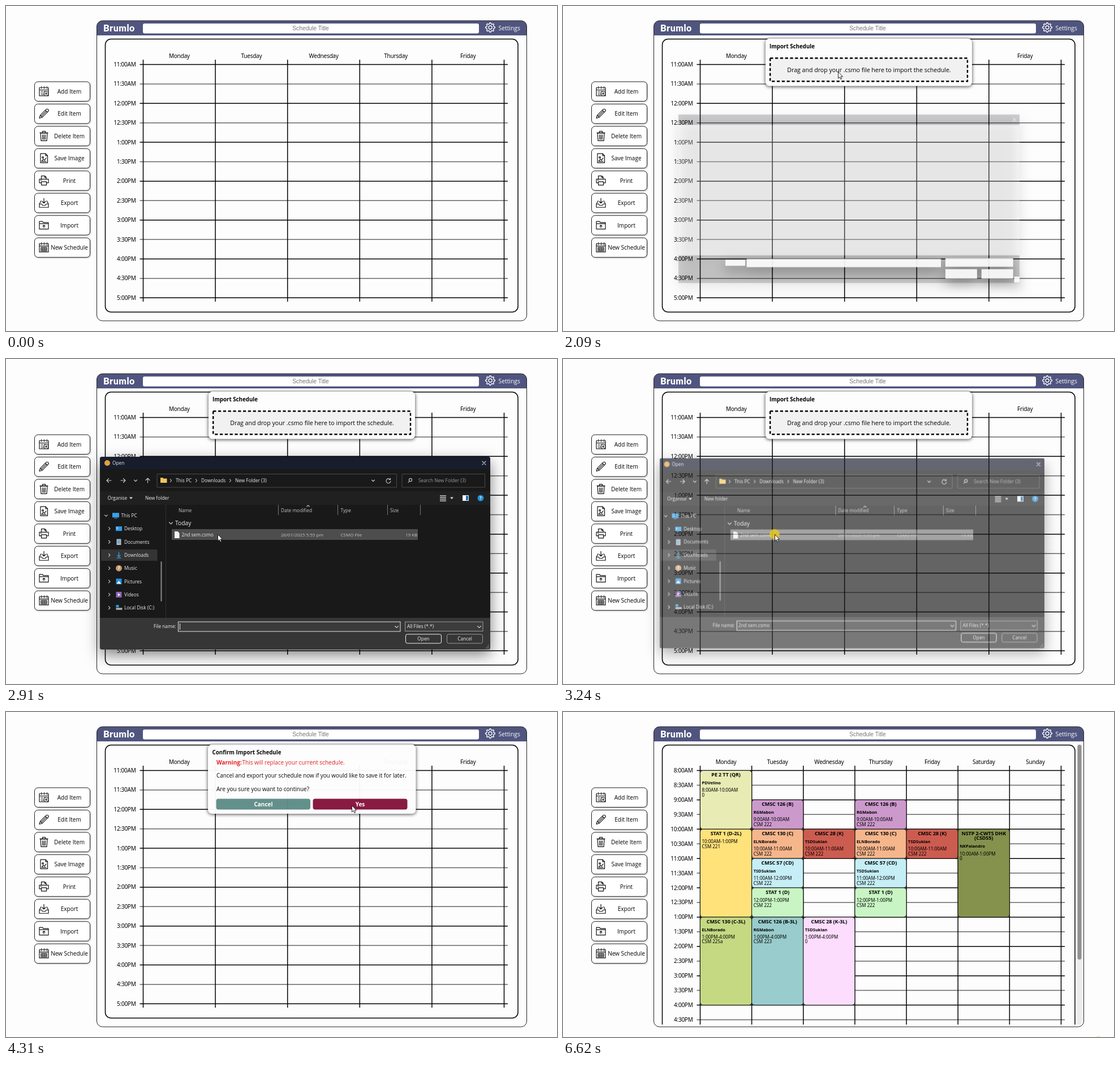
Write an HTML page that moves like this. It is 974 px wide and 575 px high and loops after 6.75 s.

```html
<!DOCTYPE html>
<html lang="en">
<head>
<meta charset="utf-8">
<title>Schedule import</title>
<style>
html, body { margin: 0; width: 100%; height: 100%; overflow: hidden; background: #fdfdfd; }
#stage { display: block; width: 974px; height: 575px; }
text { font-family: "Open Sans", "Noto Sans", sans-serif; font-size: 10px; white-space: pre; }
.b { font-weight: 700; }
.m { text-anchor: middle; }
.e { text-anchor: end; }
.logo { font: 900 16px Lato, sans-serif; letter-spacing: .5px; fill: #fff; }
.field { font: 10.3px "Liberation Sans", Arial, sans-serif; fill: #777; }
.cal text { font-family: "Noto Sans", sans-serif; letter-spacing: -.25px; }
.cal .title { font-size: 9px; font-weight: 700; letter-spacing: -.1px; }
.cal .who { font-size: 7.5px; font-weight: 700; letter-spacing: 0; }
.cal .info { font-size: 8px; letter-spacing: 0; }
.line { fill: none; stroke: #000; stroke-width: 1.5; }
.half { fill: none; stroke: #666; stroke-width: 1.5; }
.icon { fill: none; stroke: #111; stroke-width: 1.2; stroke-linejoin: round; stroke-linecap: round; }
.btn { fill: #fff; stroke: #222; filter: drop-shadow(1px 1px 1px rgba(0,0,0,.25)); }
.pop { fill: #fdfdfd; filter: drop-shadow(0 1px 3px rgba(0,0,0,.75)); }
.dlg text { font-size: 8.3px; fill: #ededed; }
.dlg .dim { fill: #9a9a9a; }
.dlg .soft { fill: #c4c4c4; }
.thin { fill: none; stroke: #c8c8c8; stroke-width: 1.1; stroke-linecap: round; stroke-linejoin: round; }
.rule { fill: none; stroke: #4a4a4a; }

/* One loop is 6750 ms, so 1% is 67.5 ms. */
.old, .week, .blank, .pulse, .row, .pick, .type, .hover, .drop, .dlg, .import, .confirm, .cursor {
  animation: 6750ms linear infinite;
}
.old, .week, .blank, .pulse, .row, .pick, .type { animation-timing-function: step-end; }
.dlg, .blank { transform-origin: 511px 343.5px; filter: drop-shadow(0 9px 13px rgba(0,0,0,.5)); }
.blank { transform: translate(-5.5px, -2.5px) scale(.874); }

.old { animation-name: old; }
.week { animation-name: week; }
.blank { animation-name: blank; }
.pulse { animation-name: pulse; }
.row { animation-name: row; }
.pick { animation-name: pick; }
.type { animation-name: type; }
.hover { animation-name: hover; }
.drop { animation-name: drop; }
.dlg { animation-name: dlg; }
.import { animation-name: import; }
.confirm { animation-name: confirm; }
.cursor { animation-name: cursor; }

@keyframes old { 0% { opacity: 1 } 64.7%, 100% { opacity: 0 } }
@keyframes week { 0% { opacity: 0 } 64.7%, 100% { opacity: 1 } }
@keyframes blank { 0% { opacity: 0 } 30.9% { opacity: 1 } 31.9%, 100% { opacity: 0 } }
@keyframes pulse {
  0% { opacity: 0 } 11.4% { opacity: 1 } 13.4% { opacity: 0 }
  27.9% { opacity: 1 } 29.6% { opacity: 0 }
  44% { opacity: 1 } 45.1% { opacity: 0 }
  46.9% { opacity: 1 } 48.8% { opacity: 0 }
  62.7% { opacity: 1 } 63.8% { opacity: 0 }
  98%, 100% { opacity: 1 }
}
@keyframes row { 0% { fill: #191919 } 40% { fill: #4d4d4d } 44.1%, 100% { fill: #777 } }
@keyframes pick { 0% { opacity: 0 } 44.1%, 100% { opacity: 1 } }
@keyframes type { 0% { opacity: 1 } 44.1%, 100% { opacity: 0 } }
@keyframes hover { 0%, 8.6% { fill: #fff } 10%, 15% { fill: #e9e9e9 } 16.6%, 100% { fill: #fff } }
@keyframes drop { 0%, 21.5% { fill: #fdfdfd } 23.5%, 100% { fill: #f1f1f1 } }
@keyframes dlg {
  0%, 31.9% { opacity: 0; transform: scale(.95) }
  32% { opacity: .8; transform: scale(.97) }
  33%, 46.963% { opacity: 1; transform: none }
  48% { opacity: .68; transform: scale(.987) }
  48.9%, 100% { opacity: 0; transform: scale(.95) }
}
@keyframes import {
  0%, 12.4% { opacity: 0 } 15.5%, 48.1% { opacity: 1 } 49.5%, 100% { opacity: 0 }
}
@keyframes confirm {
  0%, 48.9% { opacity: 0 } 49.926% { opacity: .88 } 51%, 63.8% { opacity: 1 } 65.7%, 100% { opacity: 0 }
}
@keyframes cursor {
  0% { transform: translate(926px, 590px) }
  1.037% { transform: translate(925px, 568px); animation-timing-function: ease-in-out }
  10.37%, 15.5% { transform: translate(112px, 388px); animation-timing-function: ease-in-out }
  26%, 35% { transform: translate(486px, 116px); animation-timing-function: ease-in-out }
  41.04%, 55% { transform: translate(374px, 310px); animation-timing-function: ease-in-out }
  61.8%, 75.7% { transform: translate(611px, 165px) }
  76.741% { transform: translate(615.3px, 169px); animation-timing-function: ease-in-out }
  86.074% { transform: translate(935px, 552px); animation-timing-function: ease-out }
  90.222%, 100% { transform: translate(946.5px, 583px) }
}
</style>
</head>
<body>
<svg id="stage" viewBox="0 0 974 575">
  <rect x="160.5" y="26" width="760" height="531" rx="10" fill="#fdfdfd"/>
  <path d="M160.5 52V36a10 10 0 0 1 10-10h740a10 10 0 0 1 10 10v16z" fill="#50557f"/>
  <text class="logo" x="172" y="45">Brumlo</text>
  <rect x="242" y="31" width="594" height="17.5" rx="3" fill="#fff"/>
  <text class="field m" x="538.5" y="43.2">Schedule Title</text>
  <g id="gear" fill="none" stroke="#fff" stroke-width="1.3"></g>
  <text x="870.5" y="43.3" fill="#fff" style="font-size:10.4px">Settings</text>

  <g class="cal old" id="days5"></g>
  <svg width="974" height="553"><g class="cal week" id="days7"></g></svg>
  <rect x="160.5" y="26" width="760" height="531" rx="10" fill="none" stroke="#222"/>
  <g id="buttons"></g>

  <g class="import">
    <rect class="pop" x="358" y="57.5" width="365" height="84" rx="7"/>
    <text class="b" x="365" y="74.5" style="font-size:9.75px">Import Schedule</text>
    <rect class="drop" x="366.2" y="92.2" width="348.8" height="41" stroke="#000" stroke-width="2.4" stroke-dasharray="5.2 3.6"/>
    <text class="m" x="541" y="116.6" style="font-size:10.6px">Drag and drop your .csmo file here to import the schedule.</text>
  </g>

  <g class="blank">
    <rect x="166" y="173" width="690" height="21" fill="rgba(20,22,30,.2)"/>
    <rect x="166" y="194" width="690" height="264" fill="rgba(255,255,255,.24)"/>
    <rect x="166" y="458" width="690" height="56" fill="rgba(20,20,20,.18)"/>
    <path d="M261 467h40v12h-40zM304 465h393v17H304zM706 464h137v17H706zM706 486h64v19h-64zM779 486h64v19h-64zM845 501h11v12h-11z" fill="rgba(255,255,255,.9)"/>
    <path d="M842 180l7 7m0-7l-7 7" stroke="#fff"/>
  </g>

  <g class="dlg">
    <rect x="166" y="173" width="690" height="341" rx="4" fill="#191919"/>
    <path d="M166 195v-18a4 4 0 0 1 4-4h682a4 4 0 0 1 4 4v18z" fill="#181d2c"/>
    <circle cx="179" cy="184" r="5" fill="#e3a13c"/>
    <text x="188" y="187.2">Open</text>
    <path class="thin" d="M842 181l6 6m0-6l-6 6"/>
    <path class="thin" d="M186 215h-8m3.5-3.5l-3.5 3.5 3.5 3.5M203 215h8m-3.5-3.5l3.5 3.5-3.5 3.5M226.500 214l2.500 2.500 2.500-2.500M250.500 219v-8m-3.500 3.500l3.500-3.500 3.500 3.500M646.500 214l2.500 2.500 2.500-2.500M679 213a4 4 0 1 0 1 3m-.5-5v2.500h-2.500"/>
    <path class="rule" d="M267 203.500h423.500v23.500H267zM700 203.500h146.500v23.500H700z"/>
    <path d="M273 210h4l1.500 1.500h6V219H273z" fill="#f1c65f"/>
    <path class="thin" d="M290.500 212.500l2 2.500-2 2.500M335.500 212.500l2 2.500-2 2.500M395.500 212.500l2 2.500-2 2.500"/>
    <text x="300" y="218">This PC</text>
    <text x="345" y="218">Downloads</text>
    <text x="405" y="218">New Folder (3)</text>
    <g class="thin" stroke="#888"><circle cx="715" cy="214" r="2.600"/><path d="M713 216l-2 2.500"/></g>
    <text class="dim" x="729" y="218">Search New Folder (3)</text>
    <rect x="166" y="234" width="690" height="24" fill="#202020"/>
    <text x="179.500" y="249">Organise</text>
    <path d="M218 244.500h6l-3 3.500zM785 244.500h6l-3 3.500z" fill="#ddd"/>
    <text x="246" y="249">New folder</text>
    <path d="M767 242h11m-11 3h11m-11 3h11m-11 3h11" stroke="#ccc" stroke-width="1.500"/>
    <rect x="807.500" y="241.500" width="10" height="9" fill="#1d6fb8" stroke="#eee"/>
    <path d="M808 242h5v8h-5z" fill="#fff"/>
    <circle cx="839" cy="246" r="5.500" fill="#1e90dc"/>
    <text class="m b" x="839" y="249">?</text>
    <path class="rule" d="M282.500 258v200" stroke-opacity=".5"/>
    <path class="rule" d="M481.500 258v18M586.500 258v18M674.500 258v18M732.500 258v18" style="stroke:#777"/>
    <path class="thin" d="M531.500 261l2.500-2 2.500 2"/>
    <text class="soft" x="305" y="270.500">Name</text>
    <text class="soft" x="486" y="270.500">Date modified</text>
    <text class="soft" x="591.500" y="270.500">Type</text>
    <text class="soft" x="679" y="270.500">Size</text>
    <rect x="168" y="337" width="99.500" height="20" fill="#343434"/>
    <g id="tree"></g>
    <path d="M274.500 359v69" stroke="#8a8a8a" stroke-width="2" stroke-linecap="round"/>
    <path class="thin" d="M288.500 289l3 3 3-3"/>
    <text x="299" y="293.700" style="font-size:10.300px">Today</text>
    <rect class="row" x="293" y="301" width="435" height="19"/>
    <path d="M298 305h5.500l3 3v9H298z" fill="#f4f4f4"/>
    <text x="310.500" y="314">2nd sem.csmo</text>
    <text class="soft" x="486" y="314" style="font-size:8px">26/01/2025 5:55 pm</text>
    <text class="soft" x="591.500" y="314" style="font-size:8px">CSMO File</text>
    <text class="soft e" x="727.500" y="314" style="font-size:8px">19 KB</text>
    <path d="M166 458h690v52a4 4 0 0 1-4 4H170a4 4 0 0 1-4-4z" fill="#363636"/>
    <text class="e" x="300.500" y="476">File name:</text>
    <rect x="304.500" y="465" width="392.500" height="17" fill="#3a3a3a" stroke="#e6e6e6"/>
    <path class="type" d="M307.500 468v11" stroke="#eee"/>
    <text class="pick" x="307" y="476.300">2nd sem.csmo</text>
    <rect x="705.500" y="465" width="137.500" height="16.500" fill="#3c3c3c" stroke="#999"/>
    <text x="709" y="476">All Files (*.*)</text>
    <path class="thin" d="M687.500 472.500l3 3 3-3M833.500 472.500l3 3 3-3"/>
    <rect x="706.500" y="487" width="63" height="16" rx="3" fill="#363636" stroke="#f0f0f0"/>
    <rect x="779.500" y="487" width="63" height="16" rx="3" fill="#363636" stroke="#999"/>
    <text class="m" x="738" y="498">Open</text>
    <text class="m" x="811" y="498">Cancel</text>
    <path d="M848 511.500h6m-4-2.500h4m-2-2.500h2" stroke="#aaa" stroke-dasharray="1.300 1"/>
  </g>

  <g class="confirm">
    <rect class="pop" x="357" y="57.500" width="367.500" height="122.500" rx="7"/>
    <text class="b" x="364.500" y="74.500" style="font-size:9.750px">Confirm Import Schedule</text>
    <g fill="#e61c23"><text class="b" x="372" y="93">Warning:</text><text x="417.500" y="93">This will replace your current schedule.</text></g>
    <text x="372" y="116.300" style="font-size:9.900px">Cancel and export your schedule now if you would like to save it for later.</text>
    <text x="372" y="140.300">Are you sure you want to continue?</text>
    <rect x="371.500" y="153.500" width="166.500" height="19" rx="4" fill="#5f8d87"/>
    <rect x="542.500" y="153.500" width="167" height="19" rx="4" fill="#85123b"/>
    <g fill="#fff" class="m b"><text x="455" y="166.500">Cancel</text><text x="626" y="166.500">Yes</text></g>
  </g>

  <g class="cursor">
    <circle class="pulse" r="9" fill="#e6c81e" fill-opacity=".85"/>
    <path d="M.5.5v11.500l2.600-2.400 1.800 4 1.900-.9-1.800-3.800h3.500z" fill="#fff" stroke="#111" stroke-width=".9"/>
  </g>
</svg>
<script>
const $ = id => document.getElementById(id);
const text = (x, y, s, cls = '') => `<text class="${cls}" x="${x}" y="${y}">${s}</text>`;
const path = (d, cls) => `<path class="${cls}" d="${d}"/>`;
const LEFT = 242.5, TOP = 103.5, WIDTH = 638;
const WEEK = ['Monday', 'Tuesday', 'Wednesday', 'Thursday', 'Friday', 'Saturday', 'Sunday'];

function clock(half) {
  const h = half >> 1;
  return `${(h + 11) % 12 + 1}:${half % 2 ? '30' : '00'}${h < 12 ? 'AM' : 'PM'}`;
}

function grid(days, start, rows, pitch, bottom) {
  const col = WIDTH / days;
  let s = '';
  for (let i = 0; i <= rows; i++) {
    const y = TOP + i * pitch;
    s += path(`M236.500 ${y}H887`, i % 2 ? 'half' : 'line') + text(229.5, y + 3.5, clock(start + i), 'e');
  }
  for (let i = 0; i <= days; i++) {
    s += path(`M${LEFT + i * col} 95V${bottom}`, 'line');
    if (i < days) s += text(LEFT + (i + .5) * col, 92, WEEK[i], 'm');
  }
  return s;
}

const frame = h => `<rect class="line" x="175.500" y="58.500" width="729.500" height="${h}" rx="10"/>`;
$('days5').innerHTML = frame(483) + grid(5, 22, 12, 34.4, 523);

// Events: days, start and end hour, colour, title, teacher, room
const events = [
  [[0], 8, 10, '#e8ecb4', 'PE 2 TT (QR)', 'PDVelino', '0'],
  [[0], 10, 13, '#ffe27a', 'STAT 1 (D-2L)', '', 'CSM 221'],
  [[0], 13, 16, '#c4d982', 'CMSC 130 (C-3L)', 'ELNBorado', 'CSM 225a'],
  [[1, 3], 9, 10, '#cc99cc', 'CMSC 126 (B)', 'RGMabon', 'CSM 222'],
  [[1, 3], 10, 11, '#f6b68c', 'CMSC 130 (C)', 'ELNBorado', 'CSM 222'],
  [[1, 3], 11, 12, '#c5eef6', 'CMSC 57 (CD)', 'TSDSuklan', 'CSM 222'],
  [[1, 3], 12, 13, '#c9f5c4', 'STAT 1 (D)', '', 'CSM 222'],
  [[1], 13, 16, '#99cccc', 'CMSC 126 (B-3L)', 'RGMabon', 'CSM 223'],
  [[2, 4], 10, 11, '#cd5c50', 'CMSC 28 (K)', 'TSDSuklan', 'CSM 222'],
  [[2], 13, 16, '#fdddfd', 'CMSC 28 (K-3L)', 'TSDSuklan', '0'],
  [[5], 10, 13, '#85924d', 'NSTP 2-CWTS DHK|(CSDS5)', 'NKPalandro', '0']
];
const PITCH = 25.94, COL = WIDTH / 7;

function card(day, from, to, fill, title, who, room) {
  const x = LEFT + day * COL, y = TOP + (from - 8) * 2 * PITCH;
  const lines = title.split('|');
  let base = y + 10.7 + (lines.length - 1) * 8.5;
  let s = `<rect x="${x}" y="${y}" width="${COL}" height="${(to - from) * 2 * PITCH}" rx="5" fill="${fill}" stroke="#111"/>`;
  lines.forEach((t, i) => s += text(x + COL / 2, y + 10.7 + i * 8.5, t, 'title m'));
  if (who) s += text(x + 3, base + 13.9, who, 'who');
  base += who ? 27.2 : 14.2;
  return s + text(x + 3, base, `${clock(from * 2)}-${clock(to * 2)}`, 'info') + text(x + 3, base + 8.6, room, 'info');
}

$('days7').innerHTML = frame(520) + grid(7, 16, 17, PITCH, 560) +
  events.map(([days, ...rest]) => days.map(d => card(d, ...rest)).join('')).join('') +
  '<rect x="909" y="57" width="8" height="496" fill="#ececec"/><rect x="909.500" y="58" width="7" height="380" rx="3.500" fill="#919191"/>';

// Each icon is drawn in an 18 by 18 box.
const calendar = 'M1 3v14h16V3M1 6.500h16M1 2.500h2m3 0h2m3 0h2m3 0h1M4.500.500v3.500M9.500.500v3.500M14.500.500v3.500';
const items = [
  ['Add Item', calendar + 'M4 9h3m2 0h3M4 12h3M4 15h4M9 13a4 4 0 1 0 8 0a4 4 0 1 0-8 0M13 11v4m-2-2h4'],
  ['Edit Item', 'M1 17l1.500-5L13 1.500a2 2 0 0 1 3.500 3.500L6 15.500zM2.500 12L6 15.500M11.500 3l3.500 3.500M4.500 13.500l9-9'],
  ['Delete Item', 'M3 4l1 13.500h10L15 4zM2 3.500h14M6.500 3V.800h5V3M6.500 7l.300 8M9 7v8M11.500 7l-.300 8'],
  ['Save Image', 'M3 .800h9l3.500 3.500V17H3zM12 1v3.500h3.500M5 14.500l3-4 2 2 3-4M5.800 7.500a1.300 1.300 0 1 0 2.600 0a1.300 1.300 0 1 0-2.600 0M5 14.500h8'],
  ['Print', 'M4.500 6V.800h6L13 3v3M4.500 13H1V6.500h16V13h-3.500M4.500 11h9v6h-9zM10.500 1v2.500H13M3.500 8.500h1'],
  ['Export', 'M4 5.500L1 11v6h16v-6l-3-5.500M1 11h4l1.500 2.500h5L13 11h4M9 1v8.500M6 6.500l3 3 3-3'],
  ['Import', 'M1 16V2.500h5.500L8 4.500h9V16zM1 6.500h16M9 13.500V9M7 11l2-2 2 2'],
  ['New Schedule', calendar + 'M4 9h10v6H4zM4 12h10M7.300 9v6M10.700 9v6']
];
$('buttons').innerHTML = items.map(([name, d], i) => {
  const y = 134 + i * 39.45;
  return `<rect class="btn${name === 'Import' ? ' hover' : ''}" x="50.500" y="${y}" width="98" height="34.500" rx="6" fill="#fff"/>` +
    `<path class="icon" transform="translate(58 ${y + 8})" d="${d}"/>` + text(112, y + 21, name, 'm');
}).join('');

let cog = '';
for (let i = 0; i < 32; i++) {
  const a = (i - .5) * Math.PI / 16, r = i % 4 < 2 ? 8.3 : 6.3;
  cog += `${i ? 'L' : 'M'}${856 + r * Math.cos(a)} ${38 + r * Math.sin(a)}`;
}
$('gear').innerHTML = `<path d="${cog}z"/><circle cx="856" cy="38" r="3"/>`;

const places = [
  ['This PC', '#3aa0e8'], ['Desktop', '#2f9be6'], ['Documents', '#a9bccb'], ['Downloads', ''],
  ['Music', '#c99a6b'], ['Pictures', '#2b8fe0'], ['Videos', '#8a68b8'], ['Local Disk (C:)', '#a8b0b8']
];
$('tree').innerHTML = places.map(([name, color], i) => {
  const y = 276.8 + i * 23.35, x = i ? 199.5 : 194;
  const arrow = i ? `M181.500 ${y - 2.500}l2.500 2.500-2.500 2.500` : `M174.500 ${y - 1}l2.500 2.500 2.500-2.500`;
  const shapes = {
    'This PC': `<path d="M${x - 6} ${y - 4.500}h12v8h-12zM${x - 3} ${y + 4.500}h6v1h-6z" fill="${color}"/>`,
    'Downloads': `<path d="M${x} ${y - 5}v8m-3-3l3 3 3-3M${x - 4} ${y + 5}h8" fill="none" stroke="#2ea3e6" stroke-width="1.300"/>`,
    'Music': `<circle cx="${x}" cy="${y}" r="5.500" fill="${color}"/><path d="M${x} ${y + 2}v-5l2 1" stroke="#fff" fill="none"/>`,
    'Documents': `<path d="M${x - 4} ${y - 5}h8v10.500h-8z" fill="${color}"/><path d="M${x - 2} ${y - 2}h4m-4 2h4m-4 2h4" stroke="#4682b4"/>`,
    'Pictures': `<path d="M${x - 5} ${y - 5}h10v10h-10z" fill="${color}"/><path d="M${x - 4} ${y + 4}l4-5 4 5z" fill="#fff"/>`,
    'Videos': `<path d="M${x - 5} ${y - 5}h10v10h-10z" fill="${color}"/><path d="M${x - 1.500} ${y - 2.500}l4 2.500-4 2.500z" fill="#fff"/>`,
    'Local Disk (C:)': `<path d="M${x - 5} ${y}h11v3.500h-11z" fill="${color}"/><path d="M${x - 5} ${y - 5}h5v4h-5z" fill="#2ea3e6"/>`
  };
  const icon = shapes[name] || `<path d="M${x - 5.500} ${y - 4}h11v8h-11z" fill="${color}"/><path d="M${x - 4} ${y - 2}h2m-2 2h2" stroke="#fff"/>`;
  return path(arrow, 'thin') + icon + text(i ? 209 : 203.5, y + 3, name);
}).join('');
</script>
</body>
</html>
```
